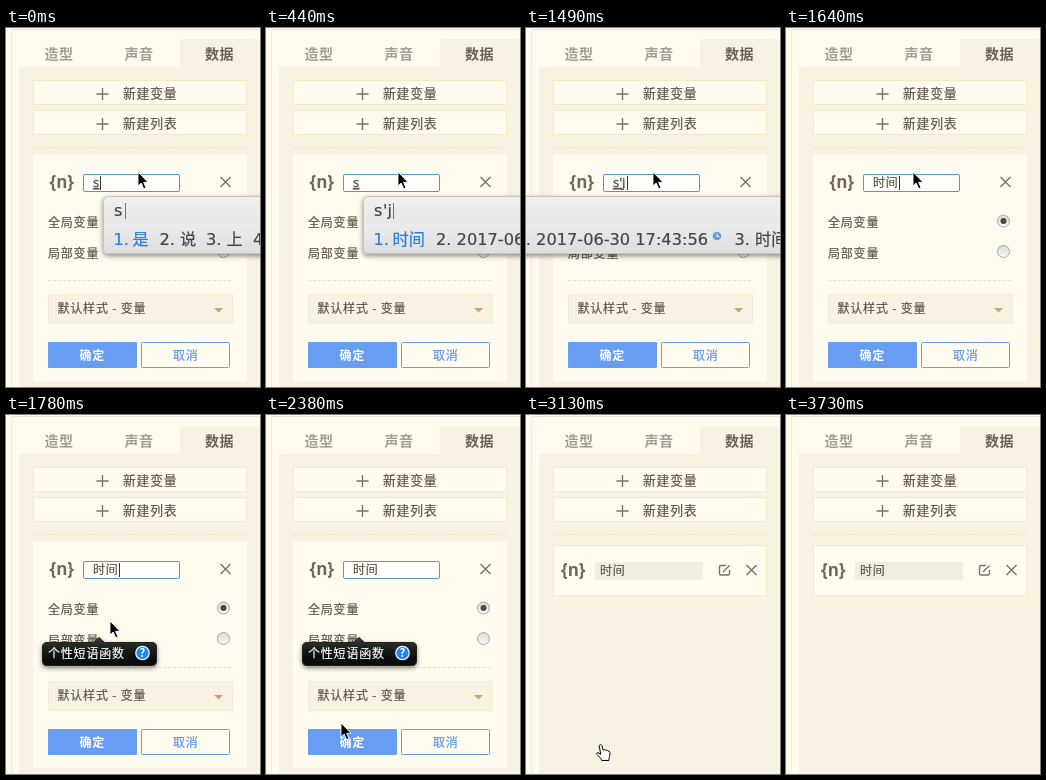
Recreate the animation shown at these times as an HTML page. Size 254x359 px, loop 3880 ms.

```html
<!DOCTYPE html>
<html lang="zh-CN">
<head>
<meta charset="utf-8">
<title>新建变量</title>
<style>
  html, body { margin: 0; width: 100%; height: 100%; overflow: hidden; background: #fffbee; }
  svg { display: block; width: 254px; height: 359px; }
  text {
    font: 12px "Noto Sans CJK SC", "Noto Sans", sans-serif; letter-spacing: .8px; white-space: pre;
    color: #5c5445; fill: currentColor; stroke: currentColor; stroke-width: .2;
  }
  .tab { font-size: 14px; letter-spacing: .4px; font-weight: bold; color: #a09d96; stroke: none; }
  .add { font-size: 12.8px; }
  .bold { font-weight: bold; stroke: none; }
  .braces { font: bold 17px "Open Sans", "Noto Sans", sans-serif; letter-spacing: 0; color: #716854; stroke: none; }
  .typed { font: 13px "Open Sans", "Noto Sans", sans-serif; letter-spacing: 0; text-decoration: underline; stroke-width: .4; }
  .ime text { font: 16.2px "DejaVu Sans", "Noto Sans CJK SC", sans-serif; letter-spacing: 0; color: #444; }
  .ime .pick { color: #2a7be0; }
  .panel { fill: #fffbee; stroke: #f5eac8; }
  .icon { fill: none; stroke: #7b7364; stroke-width: 1.4; }
  .dash { stroke: #ebe0c9; stroke-dasharray: 3 2; }

  .timed { animation: 3880ms step-end infinite; }
  .form { animation-name: form; }
  .item { animation-name: item; }
  .focus { animation-name: focus; }
  .caret { animation-name: caret; }
  .letter1 { animation-name: letter1; }
  .letter2 { animation-name: letter2; }
  .word { animation-name: word; }
  .list1 { animation-name: list1; }
  .list2 { animation-name: list2; }
  .tip { animation-name: tip; }
  .arrow { animation-name: arrow; }
  .hand { animation-name: hand; }

  @keyframes form { 0% { opacity: 1 } 80.67%, to { opacity: 0 } }
  @keyframes item { 0% { opacity: 0 } 80.67%, to { opacity: 1 } }
  @keyframes focus { 0% { opacity: 1 } 76.8%, to { opacity: 0 } }
  @keyframes letter1 { 0% { opacity: 1 } 15.2%, to { opacity: 0 } }
  @keyframes letter2 { 0% { opacity: 0 } 15.2% { opacity: 1 } 42.26%, to { opacity: 0 } }
  @keyframes word { 0% { opacity: 0 } 42.26%, to { opacity: 1 } }
  @keyframes list1 { 0% { opacity: 1 } 11.34%, to { opacity: 0 } }
  @keyframes list2 { 0% { opacity: 0 } 11.34%, to { opacity: 1 } }
  @keyframes tip { 0% { opacity: 0 } 45.87% { opacity: 1 } 65.2%, to { opacity: 0 } }
  @keyframes hand { 0% { opacity: 0 } 65.2% { opacity: 1 } 88.4%, to { opacity: 0 } }
  @keyframes caret {
    0% { transform: translateX(94px); opacity: 1 }
    7.73% { transform: translateX(94px); opacity: 0 }
    15.2% { transform: translateX(101px); opacity: 1 }
    26.8% { transform: translateX(101px); opacity: 0 }
    38.4% { transform: translateX(101px); opacity: 1 }
    42.26% { transform: translateX(113px); opacity: 1 }
    53.6% { transform: translateX(113px); opacity: 0 }
    69.07% { transform: translateX(113px); opacity: 1 }
    76.8%, to { transform: translateX(113px); opacity: 0 }
  }
  @keyframes arrow {
    0% { transform: translate(132px, 144px); opacity: 1 }
    34.53% { transform: translate(132px, 143px); opacity: 1 }
    38.4% { transform: translate(127px, 144px); opacity: 1 }
    45.87% { transform: translate(104px, 206px); opacity: 1 }
    49.74% { transform: translate(73px, 266px); opacity: 1 }
    53.6% { transform: translate(76px, 280px); opacity: 1 }
    57.47% { transform: translate(74px, 307px); opacity: 1 }
    61.34% { transform: translate(75px, 308px); opacity: 1 }
    65.2% { transform: translate(72px, 330px); opacity: 0 }
    88.4% { transform: translate(72px, 330px); opacity: 1 }
    92.26% { transform: translate(131px, 353px); opacity: 1 }
    96.13%, to { transform: translate(131px, 353px); opacity: 0 }
  }
</style>
</head>
<body>
<svg viewBox="0 0 254 359">
  <defs>
    <linearGradient id="bar" x2="0" y2="1">
      <stop offset="0" stop-color="#f0f0f0"/><stop offset=".46" stop-color="#e6e6e6"/>
      <stop offset=".47" stop-color="#ececec"/><stop offset="1" stop-color="#dedede"/>
    </linearGradient>
    <linearGradient id="ink" x2="0" y2="1">
      <stop offset="0" stop-color="#3a3d3a"/><stop offset=".5" stop-color="#151715"/><stop offset="1" stop-color="#050605"/>
    </linearGradient>
    <linearGradient id="knob" x2="0" y2="1">
      <stop offset="0" stop-color="#d9d9d9"/><stop offset="1" stop-color="#fafafa"/>
    </linearGradient>
    <filter id="shadow" x="-20%" y="-30%" width="140%" height="180%">
      <feDropShadow dx="0" dy="2" stdDeviation="2.5" flood-opacity=".45"/>
    </filter>
    <path id="cross" class="icon" d="M-5-5 5 5M5-5-5 5"/>
    <path id="plus" class="icon" d="M-6 0H6M0-6V6"/>
  </defs>

  <!-- sidebar -->
  <path fill="#fffbee" d="M0 0H254V359H0z"/>
  <path stroke="#ece4d1" d="M6 1.5H254"/>
  <path stroke="#f4ecd9" d="M5.5 2V359"/>
  <path fill="#f8f2e2" d="M13 39H174V11H254V359H13z"/>
  <text class="tab" x="38.5" y="31">造型</text>
  <text class="tab" x="118.5" y="31">声音</text>
  <text class="tab" x="199" y="31" style="color:#666159">数据</text>
  <rect class="panel" x="27.5" y="52.5" width="213" height="24"/>
  <rect class="panel" x="27.5" y="82.5" width="213" height="24"/>
  <use href="#plus" x="96.5" y="66"/>
  <use href="#plus" x="96.5" y="96"/>
  <text class="add" x="117" y="70">新建变量</text>
  <text class="add" x="117" y="100">新建列表</text>
  <path class="dash" d="M27 119.5H241"/>

  <!-- saved variable -->
  <g class="timed item">
    <rect class="panel" x="27.5" y="130.5" width="213" height="50"/>
    <text class="braces" x="35" y="161">{n}</text>
    <path fill="#f0ede3" d="M69 147H177V165H69z"/>
    <text x="74" y="160">时间</text>
    <path class="icon" d="M200 150.5H195Q193.5 150.5 193.5 152V158.5Q193.5 160 195 160H202Q203.5 160 203.5 158.5V155M197 157 203.5 150.5"/>
    <use href="#cross" x="225.5" y="155"/>
  </g>

  <!-- variable editor -->
  <g class="timed form">
    <path fill="#fffbee" d="M27 127H241V353H27z"/>
    <text class="braces" x="43.5" y="160">{n}</text>
    <rect x="77.5" y="146.5" width="96" height="17" rx="2" fill="#f8f2e2" stroke="#f3ead2"/>
    <rect class="timed focus" x="77.5" y="146.5" width="96" height="17" rx="1.5" fill="#fffefa" stroke="#4f9ad6"/>
    <text class="typed timed letter1" x="87" y="159">s</text>
    <text class="typed timed letter2" x="87" y="159">s'j</text>
    <text class="timed word" x="87" y="159">时间</text>
    <path class="timed caret" fill="#333" d="M0 148H1V162H0z"/>
    <use href="#cross" x="219.5" y="154"/>

    <text x="42" y="198.5">全局变量</text>
    <text x="42" y="229.5">局部变量</text>
    <g fill="url(#knob)" stroke="#aaa5a0">
      <circle cx="217.5" cy="193" r="6"/>
      <circle cx="217.5" cy="223.5" r="6"/>
    </g>
    <circle cx="217.5" cy="193" r="3" fill="#4a4a4a"/>
    <path class="dash" d="M42 252.5H227"/>

    <rect x="42.5" y="266.5" width="184" height="29" fill="#f8f2e2" stroke="#f5ecd6"/>
    <text x="51.5" y="285">默认样式 - 变量</text>
    <path fill="#c9a273" d="M208 280H217L212.5 284.5z"/>

    <rect x="42" y="314" width="89" height="26" rx="1" fill="#679df3"/>
    <text class="bold" x="73.5" y="332" style="color:#fff">确定</text>
    <rect x="135.5" y="314.5" width="88" height="25" rx="1" fill="#fffbee" stroke="#679df3"/>
    <text x="167" y="332" style="color:#5a94ee">取消</text>
  </g>

  <!-- input method candidates -->
  <g class="ime">
    <g class="timed letter1">
      <rect x="97.5" y="168.5" width="180" height="57" rx="4" fill="url(#bar)" stroke="#c4c4c4" filter="url(#shadow)"/>
      <text x="108" y="188">s</text>
      <text class="pick" x="107.5" y="217">1. </text>
      <g class="timed list1">
        <path fill="#3f7fd0" d="M119 175H120V191H119z"/>
        <text class="pick" x="126.5" y="217">是</text>
        <text x="153.5" y="217">2. 说</text>
        <text x="200" y="217">3. 上</text>
        <text x="247" y="217">4. 三</text>
      </g>
      <g class="timed list2">
        <text x="117" y="188">'j</text>
        <path fill="#3f7fd0" d="M127 175H128V191H127z"/>
        <text class="pick" x="126.5" y="217">时间</text>
        <text x="170" y="217">2. 2017-06-30 17:43:56</text>
      </g>
    </g>
    <g class="timed letter2">
      <rect x="-20" y="168.5" width="294" height="57" fill="url(#bar)" stroke="#c4c4c4" filter="url(#shadow)"/>
      <text x="-10.5" y="217">2. 2017-06-30 17:43:56</text>
      <circle cx="191" cy="208" r="4.3" fill="#5e9fd8"/>
      <path fill="none" stroke="#fff" d="M191 205.5V208.5H193.5"/>
      <text x="208.5" y="217">3. 时间</text>
    </g>
  </g>

  <!-- tooltip -->
  <g class="timed tip">
    <path filter="url(#shadow)" fill="url(#ink)" stroke="#20231f" d="M41 227.5H87.5L93 222.5 98.5 227.5H146Q150.5 227.5 150.5 232V246Q150.5 250.5 146 250.5H41Q36.5 250.5 36.5 246V232Q36.5 227.5 41 227.5z"/>
    <text x="42" y="243" style="color:#fff">个性短语函数</text>
    <circle cx="136.5" cy="238" r="6.7" fill="#1d86f0" stroke="#e8f2ff" stroke-width="1.3"/>
    <text class="bold" x="136.8" y="242.2" text-anchor="middle" style="color:#fff;font-size:11px">?</text>
  </g>

  <!-- pointers -->
  <path class="timed arrow" fill="#000" stroke="#fff" stroke-width=".9" d="M0 0V14L3.2 11.1 5.7 16.8 8 15.8 5.6 10.3H10z"/>
  <path class="timed hand" transform="translate(70 329)" fill="#fff" stroke="#000" stroke-linejoin="round" d="M3.2 2.2C3 .3 5.6 .2 6 1.8L7.2 6.2C8 5.2 9.4 5.4 9.7 6.4 10.6 5.8 11.8 6.2 12 7.2 13 6.8 14 7.6 14 8.8 14 12 13 13 12.8 16.5H5.8C5 14 2.2 12.2 .8 10.2 .2 8.8 1.8 8 3 9.2L4.8 10.4z"/>
</svg>
</body>
</html>
```
